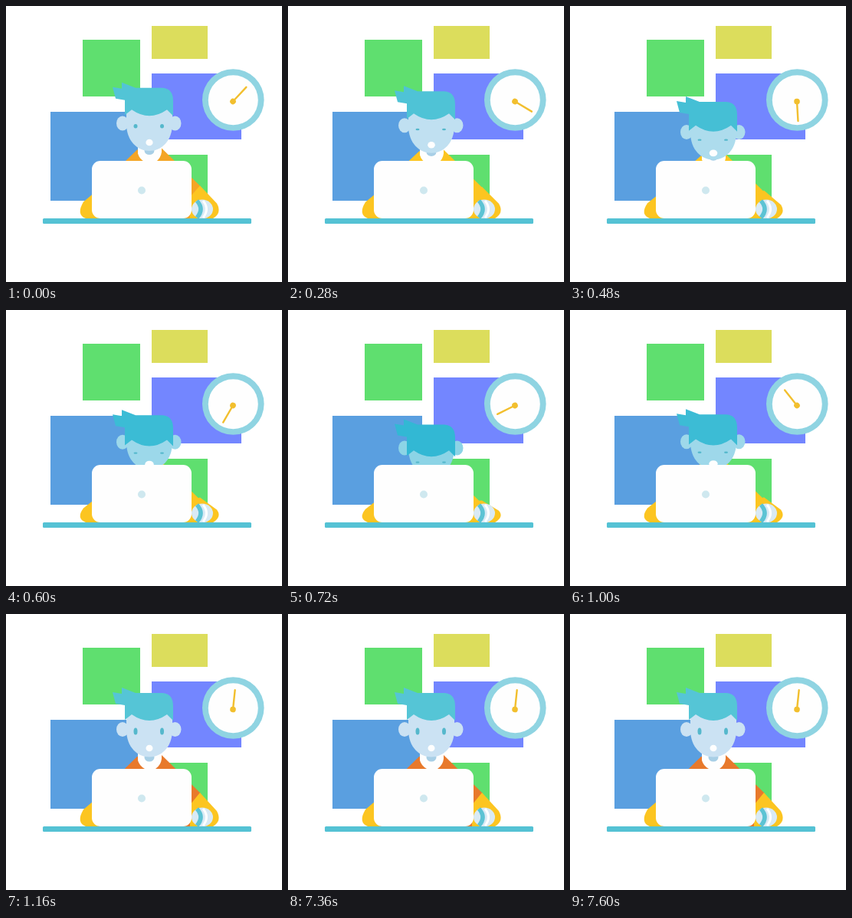
Write an HTML page that moves like this. It is 360 px wide and 360 px high and loops after 8120 ms.

```html
<!DOCTYPE html>
<html lang="en">
<head>
<meta charset="utf-8">
<title>Dozing at the desk</title>
<style>
  html, body { margin: 0; width: 100%; height: 100%; overflow: hidden; background: #fff; }
  svg { display: block; width: 100vw; height: 100vh; }
</style>
</head>
<body>
<svg viewBox="0 0 360 360">
  <rect x="100" y="44" width="75" height="74" fill="#5fdf6f"/>
  <rect x="190" y="26" width="73" height="43" fill="#dcdd5c"/>
  <rect x="190" y="88" width="117" height="86" fill="#7386ff"/>
  <rect x="58" y="138" width="117" height="116" fill="#5a9fe0"/>
  <rect x="190" y="194" width="73" height="60" fill="#5fdf6f"/>

  <circle cx="296.3" cy="122.5" r="40.3" fill="#8fd4e2"/>
  <circle cx="296.3" cy="122.8" r="32.5" fill="#fefefe"/>
  <g id="hand" fill="#f2bf2e">
    <path d="M296 124.5V99" stroke="#f2bf2e" stroke-width="2.4" stroke-linecap="round"/>
    <circle cx="296" cy="124.5" r="3.8"/>
  </g>

  <g id="person"></g>

  <ellipse cx="256" cy="265" rx="14" ry="12.5" fill="#d9eaf5"/>
  <path d="M249 254Q259 265 249 276" fill="none" stroke="#5cc3d4" stroke-width="5.5"/>
  <path d="M257 254Q266 265 257 276" fill="none" stroke="#fff" stroke-width="3"/>
  <rect x="112" y="202" width="130" height="75" rx="11" fill="#fefefe"/>
  <circle cx="177" cy="240.5" r="5" fill="#cfe8ef"/>
  <rect x="48" y="277" width="272" height="7" rx="1.5" fill="#54c2d4"/>
</svg>
<script>
const LOOP = 8120, STEP = 40, FALL = 880, WAKE = 1160;
const hand = document.getElementById('hand');
const person = document.getElementById('person');

const smooth = x => x * x * (3 - 2 * x);
const mix = (a, b, k) => `rgb(${a.map((v, i) => Math.round(v + (b[i] - v) * k))})`;

// 0 = upright, 1 = head fully bowed
function bow(t) {
  if (t <= FALL) return 0.07 + 0.93 * smooth((t / FALL) ** 1.5);
  return t < WAKE ? 1 - smooth((t - FALL) / (WAKE - FALL)) : 0;
}

const ellipse = (x, y, rx, ry, fill) =>
  `<ellipse cx="${x}" cy="${y}" rx="${rx}" ry="${ry}" fill="${fill}"/>`;
const path = (d, fill) => `<path d="${d}" fill="${fill}"/>`;

function drawPerson(q) {
  const top = 103 + 55 * q, fringe = 131 + 62 * q, ear = 150.5 + 35 * q;
  const eye = 153 + 54 * q, mouth = 175 + 42 * q, body = 23 * q;
  const eyeH = Math.max(1.2, 4.5 - 25 * q);
  const skin = mix([203, 226, 243], [128, 210, 228], q);
  const hair = mix([85, 197, 214], [44, 182, 212], q);
  const yellow = '#fcc521';
  const jacket = mix([232, 121, 43], [252, 197, 33], Math.min(1, q / 0.12));
  const arm = 257 + body * 0.25;

  return [
    // jacket and sleeves
    path(`M171 ${186 + body}L112 ${244 + body * 0.3}V277H240L254 ${234 + body}L203 ${184 + body}Z`, jacket),
    path(`M114 ${244 + body * 0.3}L101 ${255 + body * 0.25}Q91 272 104 277H120Z`, yellow),
    path(`M253 ${233 + body * 0.8}L275 ${arm}Q282 270 270 277H240V249Z`, yellow),
    // shirt and neck
    path(`M172 ${181 + body}V${191 + body}Q174 ${198 + body} 181 ${202 + body}H195Q202 ${197 + body} 203 ${189 + body}V${181 + body}Z`, '#fefefe'),
    ellipse(187, 187 + body, 6.5, 5.5, '#a8cfe6'),
    // head
    ellipse(152, ear, 8, 9.5, skin),
    ellipse(220.5, ear, 8, 9.5, skin),
    path(`M157 ${top + 15}V${ear}C157 ${ear + 48} 217 ${ear + 48} 217 ${ear}V${top + 15}Z`, skin),
    ellipse(169, eye, 2.5, eyeH, '#55b8cc'),
    ellipse(203.5, eye, 2.5, eyeH, '#55b8cc'),
    ellipse(187, mouth, 4.5 + 2 * q, 4.3, '#fefefe'),
    path(`M139 ${top - 1}L151 ${top + 1}V${top - 7}L169 ${top}H204Q218 ${top + 1} 218 ${top + 17}
      V${fringe + 8}L210 ${fringe}Q187 ${fringe + 16} 164 ${fringe}L155 ${fringe + 7}
      V${top + 16}L143 ${top + 14}Z`, hair)
  ].join('');
}

let last = -1;
function frame(now) {
  const t = Math.floor(now % LOOP / STEP) * STEP;
  if (t !== last) {
    last = t;
    const angle = 43 + 0.2785 * Math.min(t, WAKE);
    hand.setAttribute('transform', `rotate(${angle} 296 124.5)`);
    person.innerHTML = drawPerson(bow(t));
  }
  requestAnimationFrame(frame);
}
frame(performance.now());
</script>
</body>
</html>
```
